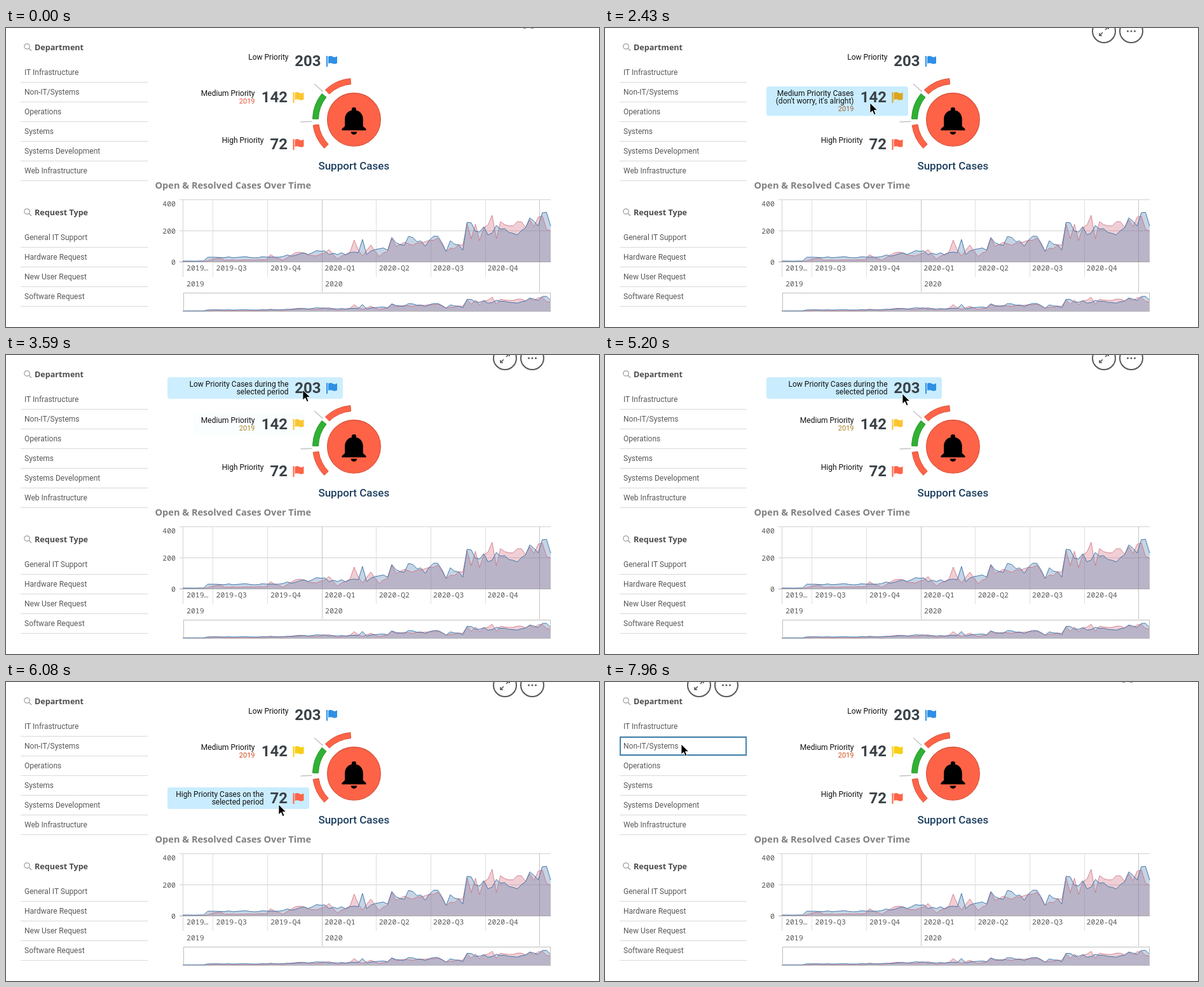
These frames come from a looping animation (933 px wide and 471 px high, 8000 ms). An HTML page:

```html
<!DOCTYPE html>
<html lang="en">
<head>
<meta charset="utf-8">
<title>Support Cases</title>
<style>
html, body { margin: 0; width: 100%; height: 100%; overflow: hidden; background: #fff; }
svg { display: block; width: 933px; height: 471px; }
text { font: 12px Roboto, sans-serif; fill: #111; }
.head { font: bold 12.6px "Open Sans", sans-serif; fill: #4d4d4d; }
.row { fill: #595959; }
.title { font: bold 14.55px "Open Sans", sans-serif; fill: #808080; }
.axis { font: 11.5px "Noto Sans Mono", monospace; fill: #595959; }
.num { font: bold 24px Roboto, sans-serif; fill: #3a4248; }
.year { font-size: 11px; }
.cases { font: 500 17px Roboto, sans-serif; fill: #1d3f5f; }
.end { text-anchor: end; }
.mid { text-anchor: middle; }
</style>
</head>
<body>
<svg id="stage" viewBox="0 0 933 471"></svg>
<script>
const LOOP = 8000;
const stage = document.getElementById('stage');

function add(tag, attrs, parent = stage) {
  const el = document.createElementNS('http://www.w3.org/2000/svg', tag);
  for (const k in attrs) el.setAttribute(k, attrs[k]);
  parent.appendChild(el);
  return el;
}
function label(str, x, y, cls = '', parent = stage) {
  const el = add('text', { x, y, class: cls }, parent);
  el.textContent = str;
  return el;
}
const line = (d, stroke) => add('path', { d, stroke, fill: 'none', 'shape-rendering': 'crispEdges' });
const show = (el, on) => el.setAttribute('visibility', on ? 'visible' : 'hidden');
const mix = (a, b, p) => a + (b - a) * p;

// Filter panels
const ROW = 31;
function panel(name, y, rows) {
  add('circle', { cx: 33, cy: y - 6, r: 4.2, fill: 'none', stroke: '#a0a0a0', 'stroke-width': 1.3 });
  add('path', { d: `M36 ${y - 3}l4 4`, stroke: '#a0a0a0', 'stroke-width': 1.5 });
  label(name, 45, y, 'head');
  rows.forEach((r, i) => {
    label(r, 29, y + 39 + ROW * i, 'row');
    line(`M23 ${y + 50.5 + ROW * i}h200`, '#d9d9d9');
  });
}
panel('Department', 35, ['IT Infrastructure', 'Non-IT/Systems', 'Operations', 'Systems', 'Systems Development', 'Web Infrastructure']);
panel('Request Type', 295, ['General IT Support', 'Hardware Request', 'New User Request', 'Software Request']);
const rowBox = add('rect', { x: 24, width: 198, height: 28, fill: 'none', stroke: '#4485b0', 'stroke-width': 2 });

// Priority items: right edge of the text, baseline, right edge of the number
function item(o) {
  const box = add('rect', { y: o.y - 15, rx: 4, fill: '#c9edfe' });
  const short = add('g', {}), long = add('g', {});
  label(o.name, o.x, o.y, 'end', short);
  o.lines.forEach((s, i) => label(s, o.x, o.y + 12 * i, 'end', long));
  label(o.num, o.nx, o.y + 10, 'num end');
  const fx = o.nx + 8.5, fy = o.y - 6;
  const flag = add('path', {
    d: `M${fx} ${fy}h2v17h-2zM${fx + 3} ${fy + 1}q3.5 -2 7 0t7 -.5v11q-3.5 2 -7 .5t-7 0z`, fill: o.color
  });
  return { ...o, box, short, long, flag };
}
const low = item({
  name: 'Low Priority', lines: ['Low Priority Cases during the', 'selected period'], num: '203',
  x: 444.5, y: 50, nx: 495.5, color: '#2e8fe6', slim: 370, right: 530, on: 3400, off: 5250
});
const med = item({
  name: 'Medium Priority', lines: ['Medium Priority Cases', "(don't worry, it's alright)"], num: '142',
  x: 391.5, y: 107, nx: 443, color: '#fbc531', slim: 296, right: 477, on: 1120, off: 3400
});
const high = item({
  name: 'High Priority', lines: ['High Priority Cases on the', 'selected period'], num: '72',
  x: 405.5, y: 181, nx: 443, color: '#ff6347', slim: 328, right: 477, on: 5340, off: 7240
});
const year = label('2019', 391.5, 119, 'year end');

// Alarm dial; angles run counter-clockwise from the top
const CX = 547.5, CY = 144.3;
function polar(r, deg) {
  const a = deg * Math.PI / 180;
  return `${(CX - r * Math.sin(a)).toFixed(2)} ${(CY - r * Math.cos(a)).toFixed(2)}`;
}
function arc(a, b, fill, stroke) {
  add('path', {
    d: `M${polar(65, a)}A65 65 0 0 0 ${polar(65, b)}L${polar(56, b)}A56 56 0 0 1 ${polar(56, a)}Z`, fill, stroke
  });
}
arc(5, 44, '#ff6347', '#d9543c');
arc(51, 89, '#30b034', '#289a2c');
arc(98, 134, '#ff6347', '#d9543c');
for (const a of [48, 92.5]) add('path', { d: `M${polar(66, a)}L${polar(84, a)}`, stroke: '#c4c4c4', 'stroke-width': 1.4 });
add('circle', { cx: CX, cy: CY, r: 41.8, fill: '#ff6347', stroke: '#d9543c', 'stroke-width': 1.3 });
add('path', {
  d: 'M12 22c1.1 0 2-.9 2-2h-4c0 1.1.9 2 2 2zM18 16v-5c0-3.1-1.6-5.6-4.5-6.3V4a1.5 1.5 0 0 0-3 0v.7C7.6 5.4 6 7.9 6 11v5l-2 2v1h16v-1z',
  transform: `translate(${CX - 28.6} ${CY - 24.8}) scale(2.38 2.2)`
});
label('Support Cases', 547.3, 223, 'cases mid');

// Chart frame
const X0 = 278, X1 = 857, QUARTER = 85.65;
label('Open & Resolved Cases Over Time', 234.5, 253, 'title');
line(`M273 270.5H${X1}M273 319.5H${X1}`, '#d2d2d2');
for (let i = 0; i < 7; i++) {
  const strong = i % 4 === 2;
  line(`M${Math.round(325.3 + QUARTER * i) + .5} 270V${strong ? 416 : 392}`, strong ? '#c4c4c4' : '#dedede');
}
line(`M${X0}.5 270V392`, '#d2d2d2');

// Weekly case counts: turning points [week, height] with seeded jitter between them
const WEEKS = 88;
const openedKeys = [
  [0, 0], [5, 0], [9, 6], [10, 2], [20, 3], [21, 11], [24, 2], [27, 14], [32, 9], [35, 19], [37, 4], [40, 15],
  [41, 34], [43, 9], [45, 26], [47, 8], [49, 16], [50, 37], [51, 24], [61, 37], [63, 16], [67, 26], [68, 60],
  [69, 36], [70, 59], [71, 33], [74, 73], [75, 36], [76, 63], [82, 54], [85, 70], [86, 72], [88, 48]
];
const solvedKeys = [
  [0, 1], [5, 1], [6, 7], [22, 7], [34, 17], [35, 11], [42, 14], [43, 35], [44, 11], [46, 19], [49, 18], [50, 38],
  [52, 27], [55, 38], [58, 24], [60, 40], [61, 40], [63, 16], [64, 33], [67, 18], [68, 62], [70, 48], [72, 55],
  [74, 45], [75, 57], [80, 42], [83, 69], [85, 56], [86, 77], [88, 56]
];
function series(keys, seed) {
  const vals = [];
  for (let w = 0, k = 0; w <= WEEKS; w++) {
    if (k < keys.length - 2 && w >= keys[k + 1][0]) k++;
    const [a, b] = [keys[k], keys[k + 1]];
    seed = seed * 16807 % 2147483647;
    const jitter = w === a[0] || w === b[0] ? 0 : seed / 2147483647 - .5;
    vals.push(mix(a[1], b[1], (w - a[0]) / (b[0] - a[0])) * (1 + .35 * jitter));
  }
  return vals;
}
const opened = { vals: series(openedKeys, 7), color: '#cc6677', fade: .75 };
const solved = { vals: series(solvedKeys, 11), color: '#4477aa', fade: 1 };

function plot(base, scale) {
  const both = [opened, solved].map(s => ({
    ...s,
    d: 'M' + s.vals.map((v, i) => `${(X0 + (X1 - X0) * i / WEEKS).toFixed(1)} ${(base - v * scale).toFixed(1)}`).join('L')
  }));
  for (const s of both) add('path', { d: `${s.d}V${base}H${X0}Z`, fill: s.color, 'fill-opacity': .31 });
  for (const s of both) add('path', { d: s.d, fill: 'none', stroke: s.color, 'stroke-opacity': s.fade });
}
plot(368, 1);
line(`M273 368.5H${X1}`, '#a6a6a6');
plot(446, .3);
line('M279.5 417.5H856.5V446.5H279.5Z', '#bdbdbd');

label('400', 267, 281, 'axis end');
label('200', 267, 324, 'axis end');
label('0', 267, 373, 'axis end');
label('2019…', 284, 382, 'axis');
for (let q = 3; q <= 8; q++) {
  label(`${q < 5 ? 2019 : 2020}-Q${(q - 1) % 4 + 1}`, 330.5 + 85.4 * (q - 3), 382, 'axis');
}
label('2019', 284, 406.5, 'axis');
label('2020', 502, 406.5, 'axis');

// Hover buttons
const buttons = add('g', { stroke: '#595959', fill: '#fff' });
for (const cx of [0, 43]) add('circle', { cx, cy: 5, r: 18, 'stroke-width': 2 }, buttons);
add('path', { d: 'M-7 8v4h4M-7 12l5 -5M7 2v-4h-4M7 -2l-5 5', fill: 'none', 'stroke-width': 1.6 }, buttons);
for (const cx of [37.5, 43, 48.5]) add('circle', { cx, cy: 5, r: 1.5, fill: '#595959', stroke: 'none' }, buttons);
const stub = add('path', { d: 'M814 0h4M826 0h4', stroke: '#666', 'stroke-width': 1.6 });

const cursor = add('path', { d: 'M0 0V16L3.8 12.6L6.4 18.6L9 17.5L6.4 11.6H11.5Z', stroke: '#fff', 'stroke-width': .8 });

// Pointer moves: start, end, x, y
const ENTER = [668, 471];
const moves = [
  [310, 1080, 357, 105], [1150, 1500, 371, 104], [1770, 1840, 382, 111], [2040, 2430, 417, 118], [3310, 3590, 467, 55],
  [3590, 4000, 468, 61], [5200, 5650, 418, 197], [5940, 6080, 429, 193], [7200, 7960, 120, 98]
];
const clamp = p => Math.min(1, Math.max(0, p));
function pointer(t) {
  let [x, y] = ENTER;
  for (const [from, to, tx, ty] of moves) {
    const p = clamp((t - from) / (to - from)), s = p * p * (3 - 2 * p);
    x = mix(x, tx, s);
    y = mix(y, ty, s);
  }
  return [x, y];
}

// Standard "ease" curve, solved by bisection
function ease(p) {
  if (p <= 0 || p >= 1) return clamp(p);
  let lo = 0, hi = 1;
  for (let i = 0; i < 16; i++) {
    const u = (lo + hi) / 2, v = 1 - u;
    if (.75 * v * u + u * u * u < p) lo = u; else hi = u;
  }
  const v = 1 - lo;
  return .3 * v * v * lo + 3 * v * lo * lo + lo * lo * lo;
}

const active = (o, t) => t >= o.on && t < o.off;

function render(t) {
  for (const o of [low, med, high]) {
    const hot = active(o, t);
    const x = hot ? 254 : o.slim;
    const right = hot || o === low ? o.right : o.right - 7;
    o.box.setAttribute('x', x);
    o.box.setAttribute('width', right - x);
    o.box.setAttribute('height', hot && o === med ? 46.5 : 34);
    o.box.setAttribute('opacity', ease((t - o.on) / 300) - ease((t - o.off) / 300));
    show(o.short, !hot);
    show(o.long, hot);
  }

  const hot = active(med, t);
  year.setAttribute('y', hot ? 131 : 119);
  year.style.fill = hot ? '#a0603a' : active(low, t) ? '#a8801f' : t > high.on ? '#cf4a1a' : '#e8502f';
  med.flag.setAttribute('fill', hot ? '#dca51c' : t > high.on ? '#f7ce13' : med.color);

  const [x, y] = pointer(t);
  show(cursor, t >= moves[0][0]);
  cursor.setAttribute('transform', `translate(${Math.round(x)} ${Math.round(y)})`);

  const left = x < 228;
  const fade = left ? 1 : ease((t - 1250) / 250);
  buttons.setAttribute('transform', `translate(${left ? 148 : 785} 0)`);
  buttons.setAttribute('opacity', fade);
  show(stub, left || fade === 0);

  show(rowBox, x < 222);
  rowBox.setAttribute('y', 56 + ROW * Math.floor((y - 54.5) / ROW));
}

const start = performance.now();
function tick(now) {
  render(Math.max(0, now - start) % LOOP);
  requestAnimationFrame(tick);
}
render(0);
requestAnimationFrame(tick);
</script>
</body>
</html>
```
